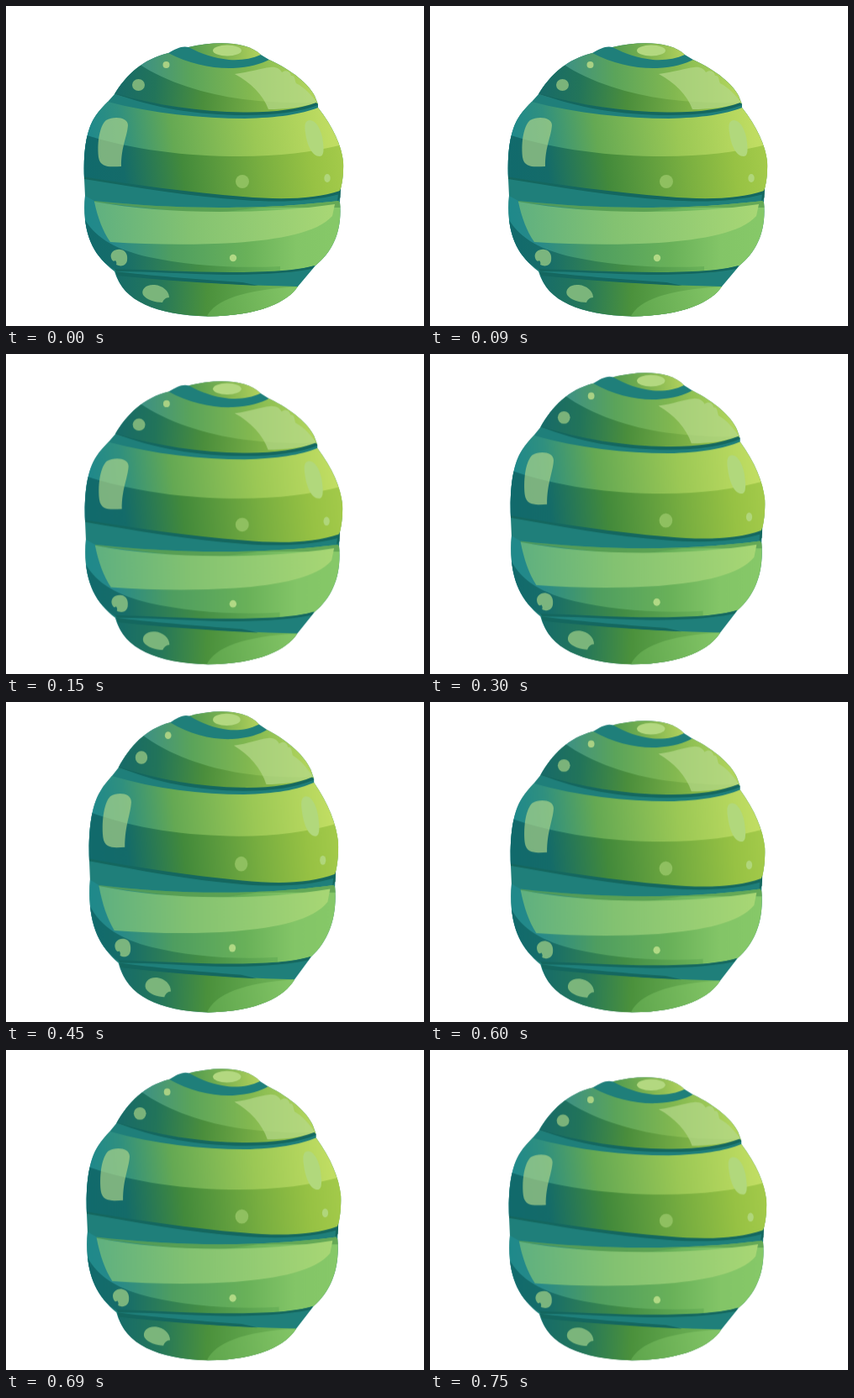
An HTML page that plays this animation: 497x381 px, repeating every 900 ms.

```html
<!DOCTYPE html>
<html lang="en">
<head>
<meta charset="utf-8">
<title>Squashing green blob</title>
<style>
  html, body { margin: 0; width: 100%; height: 100%; overflow: hidden; background: #fff; }
  svg { display: block; width: 497px; height: 381px; }
  #blob { transform-origin: 247px 369.5px; animation: stretch 900ms step-end infinite; }
  .teal { fill: #1f7f7a; }
  .edge { fill: #14675f; }
  .gloss { fill: #b4d98a; }
  @keyframes stretch {
    0% { transform: none; }
    16.6667%, 83.3333% { transform: scale(.9935, 1.036); }
    33.3333%, 66.6667% { transform: scale(.981, 1.067); }
    50% { transform: scale(.961, 1.101); }
    100% { transform: none; }
  }
</style>
</head>
<body>
<svg viewBox="0 0 497 381">
  <defs>
    <linearGradient id="cap" gradientUnits="userSpaceOnUse" x1="217" y1="60" x2="303" y2="52">
      <stop stop-color="#4f9a50"/><stop offset=".5" stop-color="#7db350"/><stop offset="1" stop-color="#b3d25d"/>
    </linearGradient>
    <linearGradient id="upperLight" gradientUnits="userSpaceOnUse" x1="160" y1="80" x2="360" y2="80">
      <stop stop-color="#3d9184"/><stop offset=".3" stop-color="#5ba45a"/><stop offset=".65" stop-color="#82b850"/><stop offset="1" stop-color="#b0d45c"/>
    </linearGradient>
    <linearGradient id="upperDark" gradientUnits="userSpaceOnUse" x1="135" y1="95" x2="368" y2="110">
      <stop stop-color="#186b67"/><stop offset=".18" stop-color="#22745a"/><stop offset=".43" stop-color="#4b8e3c"/><stop offset=".75" stop-color="#7db146"/><stop offset="1" stop-color="#a3cb4c"/>
    </linearGradient>
    <linearGradient id="midLight" gradientUnits="userSpaceOnUse" x1="100" y1="160" x2="385" y2="125">
      <stop stop-color="#20898b"/><stop offset=".13" stop-color="#30907f"/><stop offset=".34" stop-color="#65a953"/><stop offset=".68" stop-color="#9bc855"/><stop offset="1" stop-color="#c0dd62"/>
    </linearGradient>
    <linearGradient id="midDark" gradientUnits="userSpaceOnUse" x1="95" y1="205" x2="398" y2="170">
      <stop stop-color="#116a6c"/><stop offset=".15" stop-color="#146b69"/><stop offset=".38" stop-color="#438a3b"/><stop offset=".68" stop-color="#78ae40"/><stop offset=".88" stop-color="#97c244"/><stop offset="1" stop-color="#a3ca4a"/>
    </linearGradient>
    <linearGradient id="lowLight" gradientUnits="userSpaceOnUse" x1="94" y1="265" x2="390" y2="265">
      <stop stop-color="#1f898a"/><stop offset=".12" stop-color="#27898a"/><stop offset=".35" stop-color="#4f9e60"/><stop offset=".65" stop-color="#69b159"/><stop offset=".85" stop-color="#83c567"/><stop offset="1" stop-color="#86c868"/>
    </linearGradient>
    <linearGradient id="lowDark" gradientUnits="userSpaceOnUse" x1="95" y1="300" x2="320" y2="300">
      <stop stop-color="#116a6c"/><stop offset=".2" stop-color="#176d69"/><stop offset=".6" stop-color="#438d45"/><stop offset="1" stop-color="#69b158"/>
    </linearGradient>
    <linearGradient id="lowShine" gradientUnits="userSpaceOnUse" x1="105" y1="260" x2="390" y2="250">
      <stop stop-color="#5fb080"/><stop offset=".4" stop-color="#83c271"/><stop offset="1" stop-color="#a8d775"/>
    </linearGradient>
    <linearGradient id="foot" gradientUnits="userSpaceOnUse" x1="130" y1="340" x2="340" y2="350">
      <stop stop-color="#166c69"/><stop offset=".25" stop-color="#25775a"/><stop offset=".52" stop-color="#4b913c"/><stop offset="1" stop-color="#73b75a"/>
    </linearGradient>
    <linearGradient id="footShine" gradientUnits="userSpaceOnUse" x1="240" y1="360" x2="345" y2="340">
      <stop stop-color="#5fa64d"/><stop offset="1" stop-color="#83c566"/>
    </linearGradient>
    <path id="upperShape" d="M193 56C218 69 246 75 270 74C290 73 303 69 313 64C341 77 360 93 367 107L370.500 116C347 124 316 127.500 282 127C229 126 174 118 129 105C143 82 163 63 193 56Z"/>
    <path id="midShape" d="M121 114C175 128 232 134 284 134C323 133 351 129 371 121C389 144 399 166 401 186C401.500 199 400 211 397 221C367 230 327 231 282 228C218 224 154 214 93 205C92 178 94 148 107 130C111 124 116 119 121 114Z"/>
    <path id="lowShape" d="M94 226L105 232C154 237 202 240 254 240C311 240 352 237 395 232L397 234C400 267 389 292 368 309C347 315 310 318 267 318C219 318 171 315 129 314C104 299 90 270 94 226Z"/>
    <path id="footShape" d="M131 319C180 325 253 332 347 334C335 352 302 369 240 369.500C179 368 139 351 131 319Z"/>
    <clipPath id="inUpper"><use href="#upperShape"/></clipPath>
    <clipPath id="inMid"><use href="#midShape"/></clipPath>
    <clipPath id="inLow"><use href="#lowShape"/></clipPath>
    <clipPath id="inFoot"><use href="#footShape"/></clipPath>
  </defs>

  <g id="blob">
    <!-- Teal body, seen as the bands between segments -->
    <path class="teal" d="M193 56C202 51 209 47 217 49C247 42 286 41 303 58L313 64C341 77 360 93 367 107L371 117V121C389 144 399 166 401 186C401.500 199 400 211 397.500 219L397 234C400 267 389 292 368 309L347 334C335 352 302 369 240 369.500C179 368 139 351 129 316C104 297 90 270 94 226L93 205C92 178 94 148 107 130C111 124 116 119 121 114L129 105C143 82 163 63 193 56Z"/>

    <path fill="url(#cap)" d="M217 49C247 42 286 41 303 58C292 63 279 65 265 64C247 62 232 57 217 49Z"/>
    <ellipse fill="#b3d880" cx="263" cy="53" rx="17" ry="6.500"/>

    <use href="#upperShape" fill="url(#upperLight)"/>
    <g clip-path="url(#inUpper)">
      <path fill="url(#upperDark)" d="M158 69C191 91 237 105 282 111C314 115 344 116 372 115V135H120V98Z"/>
      <path class="gloss" opacity=".72" d="M272 81C289 79 303 74 314 73C321 72 326 75 328 79C334 75 338 79 339 83C344 82 343 88 345 92C355 97 363 106 370 115C351 121 331 123 312 123C306 106 291 91 272 81Z"/>
    </g>
    <path class="edge" d="M129 104C177 118 231 126 282 126.500C317 127 347 123 369 115L371 118C350 126 320 130 284 130C227 130 174 121 129 104Z"/>
    <ellipse fill="#7bb37a" cx="157.500" cy="94" rx="7.500" ry="7"/>
    <circle fill="#a9d184" cx="190.500" cy="70" r="4"/>

    <use href="#midShape" fill="url(#midLight)"/>
    <g clip-path="url(#inMid)">
      <path fill="url(#midDark)" d="M90 152C148 171 214 179 278 179C326 179 365 174 405 164V240H90Z"/>
    </g>
    <path class="edge" d="M93 203.500C153 213 218 222 282 227C327 231 367 230 397 220V224C363 233 323 234 282 231C219 227 155 216 93 206Z"/>
    <path class="edge" d="M395 224L398 217L397.500 228L394 233Z"/>
    <path class="gloss" opacity=".65" d="M110 180C108 160 112 142 119 136C128 131 145 132 145 142C144 156 137 167 137 191C126 191 112 194 110 180Z"/>
    <path fill="#b1d87c" d="M358 137C365 133 373 142 376 156C378 168 379 179 373 179C364 179 358 166 356 151C355 144 355 139 358 137Z"/>
    <ellipse fill="#b0d67b" cx="382" cy="205" rx="3.700" ry="5"/>
    <circle fill="#8fc060" cx="281" cy="209" r="8"/>

    <use href="#lowShape" fill="url(#lowLight)"/>
    <g clip-path="url(#inLow)">
      <path fill="url(#lowDark)" d="M90 247C103 276 131 290 170 299C213 308 267 313 326 310V325H90Z"/>
      <path fill="#5a9f50" opacity=".75" d="M105 230H398V240H300L240 248L105 234Z"/>
    </g>
    <path fill="url(#lowShine)" d="M105 233C150 241 200 245 254 245C306 245 350 242 391 236L388 250C370 270 326 278 272 282C220 285 171 284 124 281C115 268 109 252 105 233Z"/>
    <path fill="#7bb57e" d="M125 300C123 293 130 289 136 290C143 291 145 297 144 303C143 309 137 311 131 308C132 306 131 304 130 303C128 305 126 303 125 300Z"/>
    <circle fill="#b1d985" cx="270" cy="300" r="4.200"/>
    <path class="edge" d="M129 313C171 314 219 317 267 317C310 317 347 315 367 309L364 313C332 319 294 320 260 320C213 319 171 316 131 316Z"/>

    <use href="#footShape" fill="url(#foot)"/>
    <g clip-path="url(#inFoot)">
      <path fill="url(#footShine)" d="M238 371C247 350 283 337 350 334V375Z"/>
    </g>
    <path class="edge" d="M130 316C170 321 224 325 281 329L300 333C235 330 180 326 132 321Z"/>
    <path fill="#7bb57b" d="M163 344C160 337 167 331 177 332C186 333 194 339 194 347C190 347 187 350 186 353C178 353 167 350 163 344Z"/>
  </g>
</svg>
</body>
</html>
```
